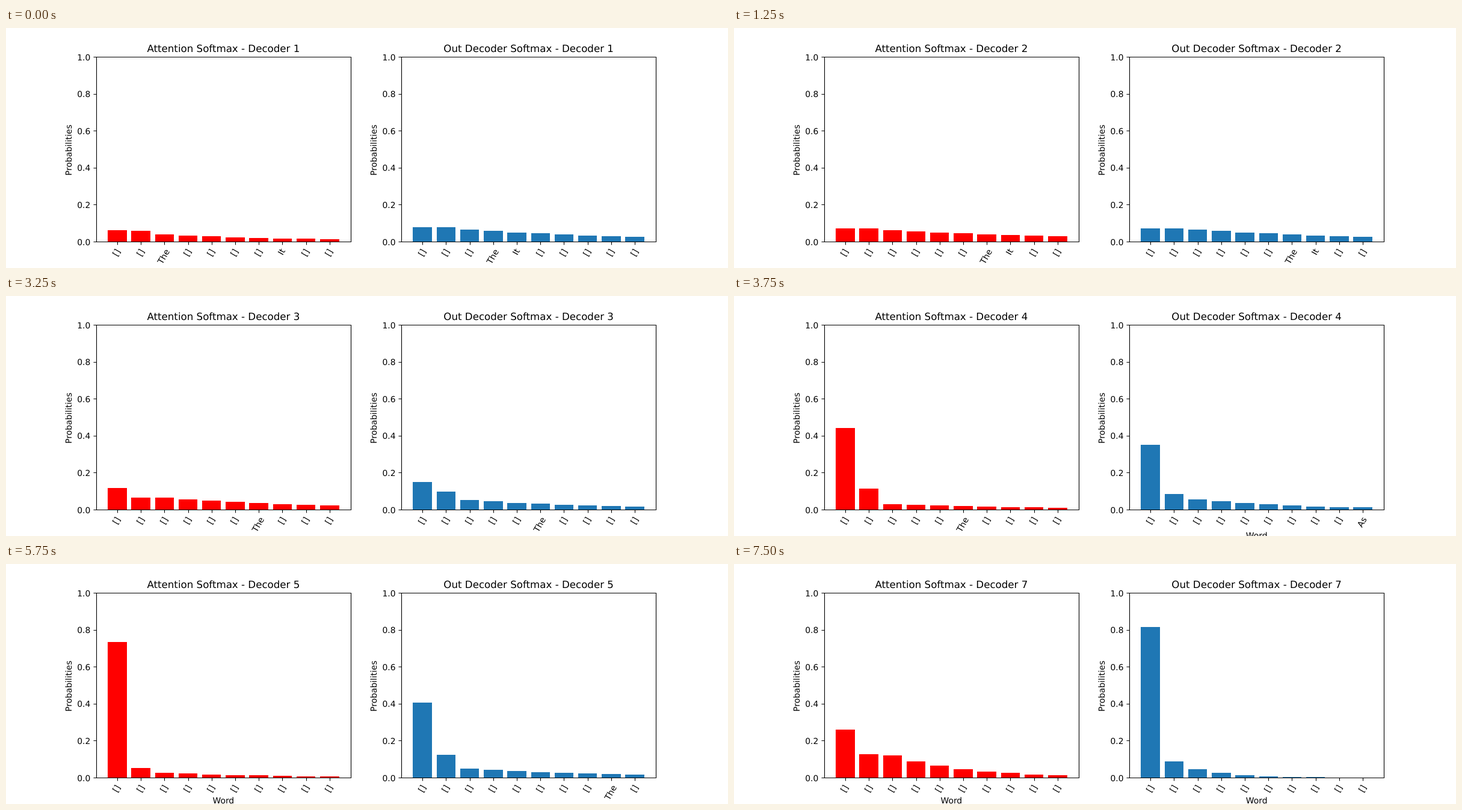
Write an HTML page that moves like this. It is 1200x400 px and loops after 8000 ms.

```html
<!DOCTYPE html>
<html lang="en">
<head>
<meta charset="utf-8">
<title>Decoder softmax</title>
<style>
  html, body { margin: 0; width: 100%; height: 100%; overflow: hidden; background: #fff; }
  svg { display: block; width: 1200px; height: 400px; }
  text { font: 13.889px "DejaVu Sans", sans-serif; text-rendering: geometricPrecision; }
  .title { font-size: 16.667px; }
  .line { fill: none; stroke: #000; stroke-width: 1.11; }
</style>
</head>
<body>
<svg id="stage" viewBox="0 0 1200 400"></svg>
<script>
const STEP = 1250, LOOP = 8000, BARS = 10;
const TOP = 48, BASE = 356, WIDTH = 422.727, UNIT = WIDTH / 10.78;
const LABEL_TOP = 365.72, SIN = Math.sin(Math.PI / 3), COS = 0.5;

// One decoder: heights of bars 1, 2, 3 and the last, then the bars with a word.
const dist = (first, second, third, last, words = {}) => ({
  words,
  height: i => Math.round(i === 0 ? first : i === 1 ? second
    : third * (last / third) ** ((i - 2) / (BARS - 3)))
});

const panels = [
  {
    x: 150, name: 'Attention Softmax', color: '#ff0000',
    steps: [
      dist(19, 18, 12, 4, { 2: 'The', 7: 'It' }),
      dist(22, 22, 19, 9, { 6: 'The', 7: 'It' }),
      dist(36, 20, 20, 7, { 6: 'The' }),
      dist(136, 35, 9, 3, { 5: 'The' }),
      dist(226, 16, 8, 2),
      dist(85, 34, 22, 6, { 8: 'The' }),
      dist(80, 39, 37, 4)
    ]
  },
  {
    x: 657.273, name: 'Out Decoder Softmax', color: '#1f77b4',
    steps: [
      dist(24, 24, 20, 8, { 3: 'The', 4: 'It' }),
      dist(22, 22, 20, 8, { 6: 'The', 7: 'It' }),
      dist(46, 30, 16, 5, { 5: 'The' }),
      dist(108, 26, 17, 3.5, { 9: 'As' }),
      dist(125, 38, 15, 5, { 8: 'The' }),
      dist(60, 34, 31, 5),
      dist(251, 27, 14, 0.2)
    ]
  }
];

const svg = document.getElementById('stage');

function add(tag, attrs, text) {
  const el = document.createElementNS('http://www.w3.org/2000/svg', tag);
  for (const key in attrs) el.setAttribute(key, attrs[key]);
  if (text) el.textContent = text;
  svg.appendChild(el);
  return el;
}

const snap = v => Math.round(v) + 0.5;
const centre = (p, i) => p.x + (i + 0.89) * UNIT;

function build(p) {
  const mid = p.x + WIDTH / 2;
  const left = snap(p.x), right = snap(p.x + WIDTH);
  let d = `M${left} ${TOP + 0.5}H${right}V${BASE + 0.5}H${left}Z`;

  p.rects = [];
  for (let i = 0; i < BARS; i++) {
    const cx = centre(p, i);
    const x = Math.round(cx - 0.4 * UNIT);
    const end = Math.round(cx + 0.4 * UNIT);
    p.rects.push(add('rect', { x, width: end - x, fill: p.color }));
    d += `M${snap(cx)} ${BASE + 0.5}v5`;
  }
  for (let i = 0; i <= 5; i++) {
    const y = BASE - i * (BASE - TOP) / 5;
    d += `M${left} ${snap(y)}h-5`;
    add('text', { x: p.x - 9.72, y: Math.round(y + 5.5), 'text-anchor': 'end' }, (i / 5).toFixed(1));
  }
  add('path', { d, class: 'line' });

  add('text', {
    'text-anchor': 'middle',
    transform: `translate(${Math.round(p.x - 41)} 203.5) rotate(-90)`
  }, 'Probabilities');
  p.title = add('text', { x: mid, y: 40, class: 'title', 'text-anchor': 'middle' });
  p.labels = p.rects.map(() => add('text', {}));
  p.xlabel = add('text', { x: mid, 'text-anchor': 'middle' }, 'Word');
}

// Places a 60 degree label so that its box hangs centred below the tick.
function placeLabel(el, word, cx) {
  el.textContent = word;
  const w = el.getComputedTextLength();
  const drop = word === '[]' ? 2 : 0;
  const x = Math.round(cx - w / 4 + 3.47 + drop * SIN) - drop * SIN - 0.3;
  const y = Math.round(LABEL_TOP + 5.5 + w * SIN + drop * COS) - drop * COS + 0.5;
  el.setAttribute('transform', `translate(${x} ${y}) rotate(-60)`);
  return w;
}

function show(p, step) {
  const { height, words } = p.steps[step];
  p.title.textContent = `${p.name} - Decoder ${step + 1}`;
  p.rects.forEach((rect, i) => {
    rect.setAttribute('y', BASE - height(i));
    rect.setAttribute('height', height(i));
  });
  const widths = p.labels.map((el, i) => placeLabel(el, words[i] || '[]', centre(p, i)));
  p.xlabel.setAttribute('y', Math.round(LABEL_TOP + 23.56 + Math.max(...widths) * SIN));
}

let shown = -1;
function render(ms) {
  const step = Math.floor((ms % LOOP) / STEP);
  if (step === shown) return;
  shown = step;
  panels.forEach(p => show(p, step));
}

panels.forEach(build);
render(0);
const start = performance.now();
requestAnimationFrame(function tick() {
  render(performance.now() - start);
  requestAnimationFrame(tick);
});
</script>
</body>
</html>
```
